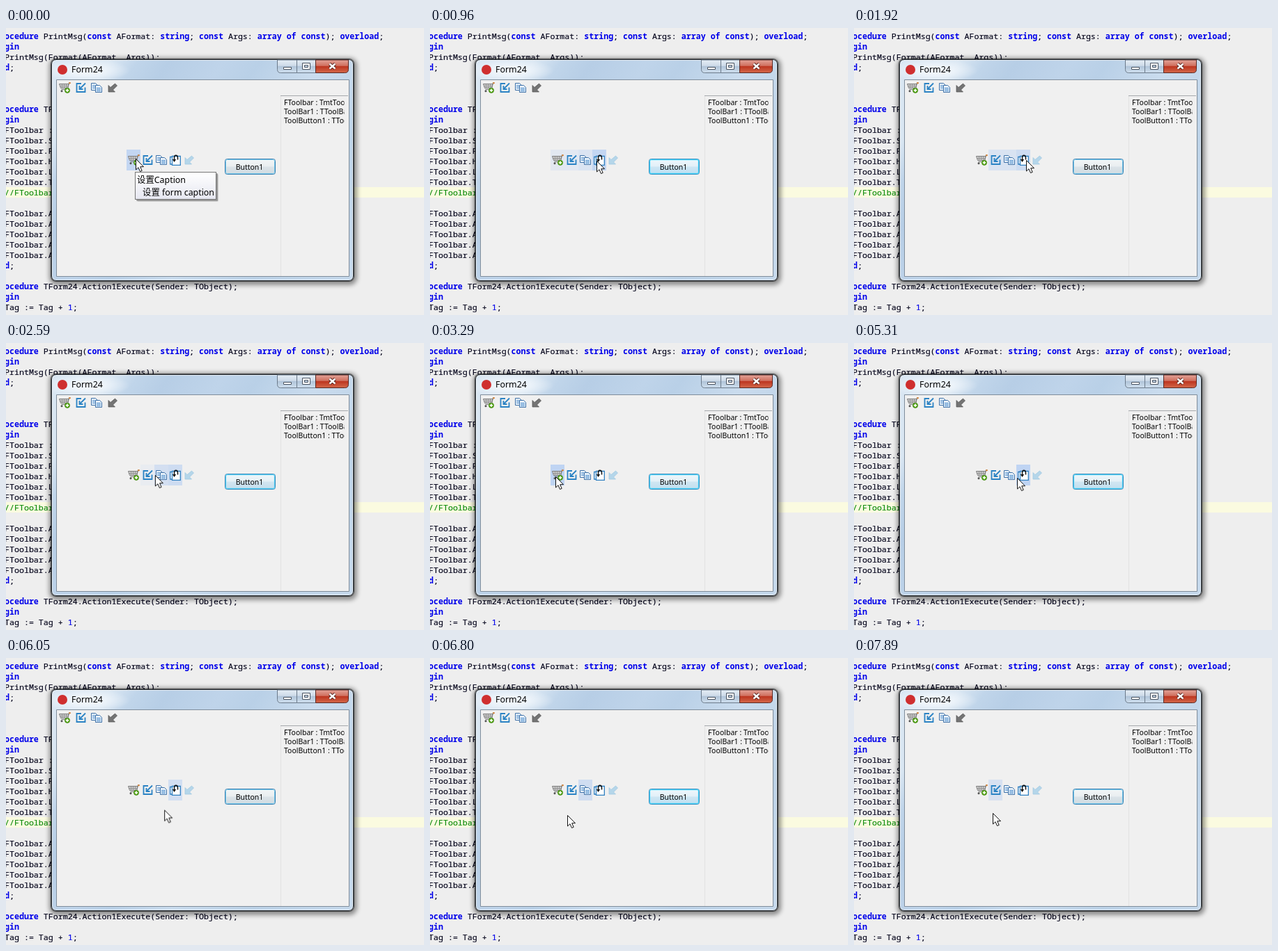
An HTML page for the animation above (8 s loop, 600x413 px).

```html
<!DOCTYPE html>
<html lang="en">
<head>
<meta charset="utf-8">
<title>Form24</title>
<style>
html, body { margin: 0; width: 100%; height: 100%; overflow: hidden; background: #eee; }
#stage { position: relative; width: 600px; height: 413px; overflow: hidden; }
#line { position: absolute; top: 229px; width: 600px; height: 15px; background: #fbfbe0; }
pre { position: absolute; margin: 0; left: -2px; top: 4px; color: #000018;
  font: 11.64px/15px "Noto Sans Mono", "DejaVu Sans Mono", monospace; -webkit-text-stroke: .15px; }
pre b { color: #0000ea; -webkit-text-stroke: 0; }
pre i { color: #0a8a0a; font-style: normal; }
pre u { color: #e01010; text-decoration: none; }
pre s { color: #0000ea; text-decoration: none; }
#win { position: absolute; left: 65px; top: 45px; width: 432px; height: 317px;
  border: 1px solid #2c343c; border-radius: 7px;
  background:
    radial-gradient(ellipse 62px 17px at 50px 15px, #f2f7fce0 35%, #f2f7fc00),
    linear-gradient(125deg, #d9e6f2 0 13%, #c0d5ea 19%, #b7cee6 26%, #bfd4ea 38%, #b9d0e7 46%, #cadcee 60%, #bcd2e7 78%, #c6d9ec);
  box-shadow: inset 0 0 0 1px #ffffffa0, 0 0 1px 1px #0009, 1px 2px 6px 4px #0006; }
svg { position: absolute; left: 0; top: 0; }
text { font-family: "Noto Sans", "Open Sans", "Noto Sans CJK SC", "Noto Sans CJK", sans-serif; font-size: 10.5px; fill: #000; }
.big { font-size: 12.4px; }
.hot rect { fill: #bfd4f3; }
.hot rect, #cursor, #tip { animation: 8s linear infinite; }
#h1 { animation-name: h1; }
#h2 { animation-name: h2; }
#h3 { animation-name: h3; }
#h4 { animation-name: h4; }
#cursor { animation-name: move; }
#tip { animation-name: tip; }
#glow { animation: glow 1s ease-in-out infinite alternate; }

@keyframes move {
  0%, 1.5% { transform: translate(186px, 188px); }
  5% { transform: translate(204px, 189px); }
  9% { transform: translate(242px, 191px); }
  13% { transform: translate(238px, 191px); }
  17.5%, 18.5% { transform: translate(202px, 190px); }
  21.5% { transform: translate(226px, 190px); }
  24%, 25.6% { transform: translate(247px, 190px); }
  29% { transform: translate(243px, 190px); }
  34% { transform: translate(200px, 190px); }
  37% { transform: translate(182px, 191px); }
  41.1%, 42.9% { transform: translate(180px, 192px); }
  45% { transform: translate(194px, 190px); }
  48% { transform: translate(234px, 186px); }
  50.2%, 52.1% { transform: translate(246px, 184px); }
  55.8% { transform: translate(245px, 232px); }
  59% { transform: translate(238px, 237px); }
  63% { transform: translate(235px, 201px); }
  66.4%, 67.9% { transform: translate(234px, 194px); }
  71% { transform: translate(235px, 205px); }
  74% { transform: translate(230px, 234px); }
  78% { transform: translate(223px, 196px); }
  80.5% { transform: translate(221px, 198px); }
  83% { transform: translate(211px, 228px); }
  85%, 86.9% { transform: translate(197px, 226px); }
  90%, 92.5% { transform: translate(200px, 223px); }
  94% { transform: translate(202px, 198px); }
  95.5% { transform: translate(201px, 201px); }
  98.6%, 100% { transform: translate(199px, 223px); }
}
@keyframes tip {
  0%, 3.2% { opacity: 1; }
  3.3%, 100% { opacity: 0; }
}
@keyframes h1 {
  0%, 3% { opacity: .9; }
  16%, 34.5% { opacity: 0; }
  36.5%, 44.5% { opacity: 1; }
  53%, 100% { opacity: 0; }
}
@keyframes h2 {
  0%, 3% { opacity: 0; }
  5%, 6% { opacity: .7; }
  15% { opacity: .1; }
  17%, 20% { opacity: .8; }
  24% { opacity: .48; }
  30%, 32% { opacity: 0; }
  33.5%, 35% { opacity: .6; }
  40.5%, 45% { opacity: 0; }
  46% { opacity: .2; }
  50%, 92.6% { opacity: 0; }
  94%, 95.6% { opacity: .85; }
  98.6%, 100% { opacity: .5; }
}
@keyframes h3 {
  0%, 5.5% { opacity: 0; }
  7%, 8% { opacity: .7; }
  14% { opacity: .3; }
  15%, 16% { opacity: .6; }
  20% { opacity: .3; }
  21.5%, 22.5% { opacity: .65; }
  24% { opacity: .5; }
  30% { opacity: .3; }
  32% { opacity: .6; }
  39%, 46% { opacity: 0; }
  47.5% { opacity: .5; }
  50.2% { opacity: .25; }
  54%, 76% { opacity: 0; }
  78%, 81% { opacity: 1; }
  85% { opacity: .65; }
  93%, 100% { opacity: 0; }
}
@keyframes h4 {
  0%, 8% { opacity: 0; }
  9.5%, 13.5% { opacity: .9; }
  22% { opacity: .1; }
  24% { opacity: .7; }
  26%, 29.5% { opacity: 1; }
  39%, 47.5% { opacity: 0; }
  50%, 54% { opacity: 1; }
  61% { opacity: .3; }
  63%, 71.5% { opacity: 1; }
  82%, 100% { opacity: 0; }
}
@keyframes glow {
  from { opacity: .1; }
  to { opacity: 1; }
}
</style>
</head>
<body>
<div id="stage">
<div id="line"></div>
<pre><b>ocedure</b> PrintMsg(<b>const</b> AFormat: <b>string</b>; <b>const</b> Args: <b>array of const</b>); <b>overload</b>;
<b>gin</b>
PrintMsg(Format(AFormat, Args));
<b>d</b>;



<b>ocedure</b> TForm24.FormCreate(Sender: TObject);
<b>gin</b>
FToolbar := TmtToolbar.Create(Self);
FToolbar.SetBounds(100, 100, 200, 30);
FToolbar.Parent := Self;
FToolbar.Height := 30;
FToolbar.Left := 100;
FToolbar.Top := 100;
<i>//FToolbar.Align := alTop;</i>

FToolbar.Add(Action1);
FToolbar.Add(Action2);
FToolbar.Add(Action3);
FToolbar.Add(Action4);
FToolbar.Add(Action5);
<b>d</b>;

<b>ocedure</b> TForm24.Action1Execute(Sender: TObject);
<b>gin</b>
Tag := Tag + <s>1</s>;
PrintMsg(Format(<u>'Action1 %d'</u>, [Tag]));</pre>
<div id="win"></div>

<svg width="600" height="413" viewBox="0 0 600 413">
<defs>
  <linearGradient id="cap" x2="0" y2="1">
    <stop offset="0" stop-color="#e6eef6"/><stop offset=".45" stop-color="#cddae8"/>
    <stop offset=".5" stop-color="#b0c4d9"/><stop offset="1" stop-color="#cfdfee"/>
  </linearGradient>
  <linearGradient id="red" x2="0" y2="1">
    <stop offset="0" stop-color="#e3a398"/><stop offset=".45" stop-color="#d0705f"/>
    <stop offset=".5" stop-color="#bd3520"/><stop offset="1" stop-color="#d3684a"/>
  </linearGradient>
  <linearGradient id="face" x2="0" y2="1">
    <stop offset="0" stop-color="#f3f5f6"/><stop offset=".48" stop-color="#eaeef0"/>
    <stop offset=".52" stop-color="#dde3e7"/><stop offset="1" stop-color="#d3dbe0"/>
  </linearGradient>
  <linearGradient id="lit" x2="0" y2="1">
    <stop offset="0" stop-color="#eef7fc"/><stop offset=".48" stop-color="#e2f1f9"/>
    <stop offset=".52" stop-color="#cde7f5"/><stop offset="1" stop-color="#bfe0f2"/>
  </linearGradient>
  <linearGradient id="paper" x2="0" y2="1">
    <stop offset="0" stop-color="#fff"/><stop offset="1" stop-color="#e6e7f1"/>
  </linearGradient>
  <clipPath id="memo"><path d="M395 98H485.5V350H395Z"/></clipPath>

  <g id="cart" fill="none">
    <path d="M16.5 1H14.5L12 10.500H3.500" stroke="#777" stroke-width="1.200"/>
    <path d="M.5 2.500H14L12.500 8.500H2.500Z" fill="#cfcfcf" stroke="#7c7c7c"/>
    <path d="M1.500 5.500H13M4.500 3V8M7.500 3V8M10.500 3V8" stroke="#8a8a8a" stroke-width=".8"/>
    <path d="M14.300 1.200H16.700" stroke="#d98232" stroke-width="2"/>
    <circle cx="4" cy="12.800" r="1.500" fill="#555"/>
    <circle cx="12" cy="11.800" r="3.600" fill="#55a817" stroke="#397c0b" stroke-width=".7"/>
    <path d="M9.800 11.800H14.200M12 9.600V14" stroke="#fff" stroke-width="1.500"/>
  </g>
  <g id="into" fill="none" stroke="#2b83c4" stroke-width="1.800">
    <path d="M8 2H1.500V14H13.500V7.500"/>
    <path d="M14 1.500L6.500 9M5.500 5V10H10.500"/>
  </g>
  <g id="copy" fill="#eaf3fb" stroke="#3f71a8">
    <path d="M.5 1.500H6.500L9.500 4.500V11.500H.5Z"/>
    <path d="M2 4.500H6M2 6.500H6M2 8.500H6" stroke="#5f97cf"/>
    <path d="M6.500 4.500H12.500L15.500 7.500V14.500H6.500Z"/>
    <path d="M8 8.500H14M8 10.500H14M8 12.500H14" stroke="#4a8bcb"/>
  </g>
  <g id="paste" fill="#fff" stroke="#2f7fc0" stroke-width="1.300">
    <path d="M.7 3.500H10V14H.7Z"/>
    <path d="M3.500 2.500H15.300V15.300H3.500Z"/>
    <path d="M11.500 7.500V5Q11.500 1.300 8.800 1.300Q6.500 1.300 6.500 4.500V8" fill="none" stroke="#111" stroke-width="1.500"/>
    <path d="M3.800 7H9.200L6.500 11Z" fill="#111" stroke="none"/>
  </g>
  <path id="down" d="M10.500 1L13.500 4L7.500 10L10.500 13H1V3.500L4 6.500Z"/>
  <path id="cross" d="M464.500 51.500L472.500 58.500M472.500 51.500L464.500 58.500"/>
</defs>

<!-- caption -->
<circle cx="81" cy="60" r="7" fill="#cf2f2f"/>
<text class="big" x="94" y="64">Form24</text>
<g stroke="#6b7a8a">
  <path d="M389.500 46H417.500V64.500H394.500Q389.500 64.500 389.500 59.500Z" fill="url(#cap)"/>
  <path d="M417.500 46H444.500V64.500H417.500Z" fill="url(#cap)"/>
  <path d="M444.500 46H491.500V59.500Q491.500 64.500 486.500 64.500H444.500Z" fill="url(#red)" stroke="#5a2a25"/>
</g>
<g fill="#fff" stroke="#4a5360">
  <path d="M398.500 56.500H409.500V59.500H398.500Z"/>
  <path d="M425.500 50.500H436.500V59.500H425.500ZM428.500 53.500V56.500H433.500V53.500Z" fill-rule="evenodd"/>
</g>
<use href="#cross" stroke="#54201b" stroke-width="4.400"/>
<use href="#cross" stroke="#fff" stroke-width="2.600"/>

<!-- client area -->
<path d="M72.500 74.500H492.500V357.500H72.500Z" fill="#f0f0f0" stroke="#7f8d9b"/>
<use href="#cart" x="76" y="78"/>
<use href="#into" x="100" y="78"/>
<use href="#copy" x="122" y="78"/>
<use href="#down" x="146" y="79" fill="#747474" stroke="#4f4f4f" stroke-width=".7"/>
<path d="M394.500 357V97.500" stroke="#e2e2e2"/>
<path d="M394 97.500H491" stroke="#a5a8ac"/>
<g clip-path="url(#memo)">
  <text x="399" y="111">FToolbar : TmtToolbar</text>
  <text x="399" y="124">ToolBar1 : TToolBar</text>
  <text x="399" y="137">ToolButton1 : TToolButton</text>
</g>

<!-- floating toolbar -->
<g class="hot">
  <rect id="h1" x="173" y="175" width="20" height="30"/>
  <rect id="h2" x="193" y="175" width="20" height="30"/>
  <rect id="h3" x="213" y="175" width="20" height="30"/>
  <rect id="h4" x="233" y="175" width="20" height="30"/>
</g>
<use href="#cart" x="175" y="182"/>
<use href="#into" x="196" y="182"/>
<use href="#copy" x="215" y="182"/>
<use href="#paste" x="235" y="182"/>
<use href="#down" x="256" y="183" fill="#b5d6ea" stroke="#9cc6e0" stroke-width=".7"/>

<!-- button -->
<rect x="314.500" y="188.500" width="72" height="22" rx="3" fill="url(#face)" stroke="#3c7fb1"/>
<rect x="315.500" y="189.500" width="70" height="20" rx="2" fill="none" stroke="#7cc4e6"/>
<g id="glow">
  <rect x="315.500" y="189.500" width="70" height="20" rx="2" fill="url(#lit)" stroke="#3fd0f8" stroke-width="1.400"/>
</g>
<text x="349.500" y="204" text-anchor="middle">Button1</text>

<g id="tip">
  <rect x="188" y="210" width="117" height="40" rx="2" fill="#0002"/>
  <rect x="187" y="209" width="117" height="40" rx="1" fill="#0004"/>
  <rect x="185.500" y="207.500" width="116" height="39" fill="url(#paper)" stroke="#767676"/>
  <text class="big" x="188" y="223">设置Caption</text>
  <text class="big" x="196" y="240.500">设置 form caption</text>
</g>
<path id="cursor" d="M.5 .5V16L4 12.700L6.500 18.500L9.200 17.400L6.700 11.700H11.500Z" fill="#fff" stroke="#111"/>
</svg>
</div>
</body>
</html>
```
